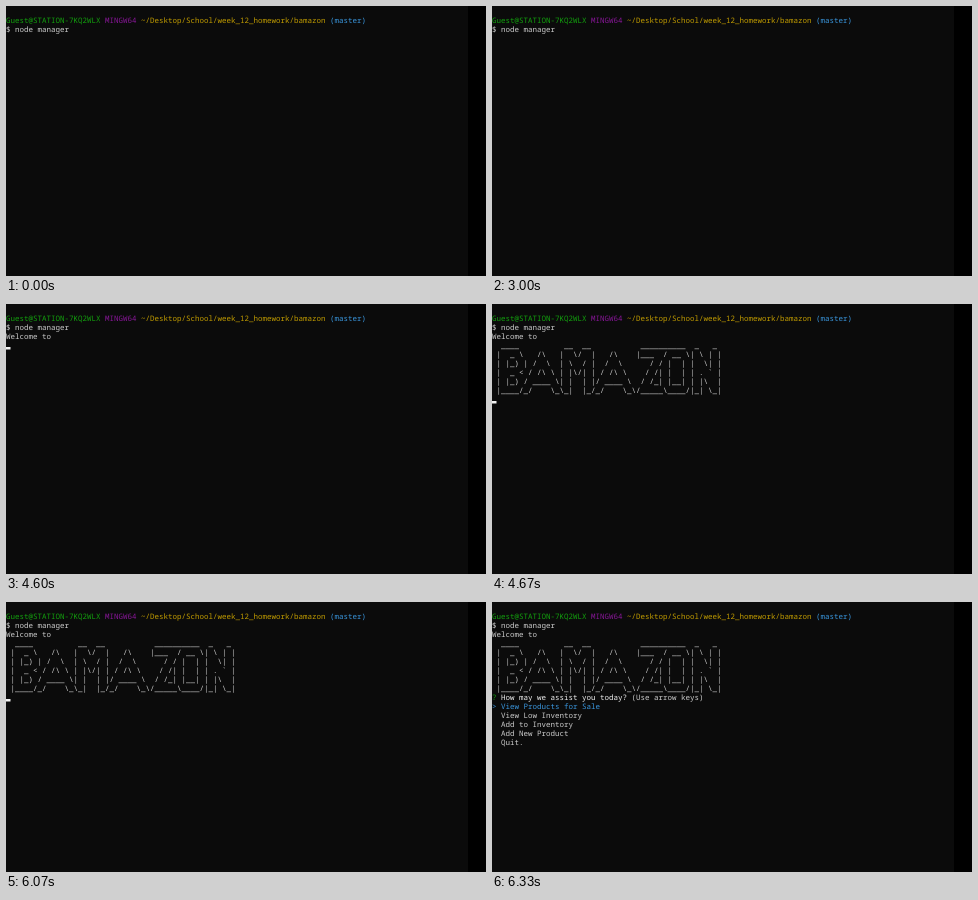
An HTML page that plays this animation: 480 px wide and 270 px high, repeating every 8000 ms.

```html
<!DOCTYPE html>
<html lang="en">
<head>
<meta charset="utf-8">
<title>Terminal</title>
<style>
  html, body { margin: 0; width: 100%; height: 100%; overflow: hidden; background: #000; }
  svg { display: block; width: 480px; height: 270px; }
  text {
    font: 500 7.5px "Noto Sans Mono", "DejaVu Sans Mono", monospace;
    white-space: pre;
    text-rendering: geometricPrecision;
  }
</style>
</head>
<body>
<svg id="stage" viewBox="0 0 480 270">
  <rect width="462" height="270" fill="#0b0b0b"/>
</svg>
<script>
const LOOP = 8000, ROW = 9, BASELINE = 16.6;
const GREY = '#cccccc', WHITE = '#f2f2f2', GREEN = '#13a10e',
      PURPLE = '#881798', GOLD = '#c19c00', BLUE = '#3a96dd';
const stage = document.getElementById('stage');

function add(parent, tag, attrs, content = '') {
  const el = document.createElementNS('http://www.w3.org/2000/svg', tag);
  for (const key in attrs) el.setAttribute(key, attrs[key]);
  el.textContent = content;
  return parent.appendChild(el);
}

// steps: [time in ms, style] pairs, each held until the next one
function play(el, steps) {
  const frames = steps.map(([time, style]) => ({ offset: time / LOOP, easing: 'step-end', ...style }));
  frames.push({ ...steps.at(-1)[1], offset: 1 });
  el.animate(frames, { duration: LOOP, iterations: Infinity });
}

// each line is a list of [colour, text] runs
function print(time, firstRow, lines) {
  const group = add(stage, 'g', {});
  lines.forEach((runs, i) => {
    const line = add(group, 'text', { x: 0, y: BASELINE + (firstRow + i) * ROW });
    for (const [fill, content] of runs) add(line, 'tspan', { fill }, content);
  });
  if (time) play(group, [[0, { opacity: 0 }], [time, { opacity: 1 }]]);
}

const banner = String.raw`
  ____          __  __           __________  _   _
 |  _ \   /\   |  \/  |   /\    |___  / __ \| \ | |
 | |_) | /  \  | \  / |  /  \      / / |  | |  \| |
 |  _ < / /\ \ | |\/| | / /\ \    / /| |  | | . ${'`'} |
 | |_) / ____ \| |  | |/ ____ \  / /_| |__| | |\  |
 |____/_/    \_\_|  |_/_/    \_\/_____\____/|_| \_|`.split('\n').slice(1);

print(0, 0, [
  [[GREEN, 'Guest@STATION-7KQ2WLX '], [PURPLE, 'MINGW64 '],
   [GOLD, '~/Desktop/School/week_12_homework/bamazon '], [BLUE, '(master)']],
  [[GREY, '$ node manager']]
]);
print(4600, 2, [[[GREY, 'Welcome to']]]);
print(4670, 3, banner.map(line => [[GREY, line]]));
print(6270, 9, [
  [[GREEN, '? '], [WHITE, 'How may we assist you today? '], [GREY, '(Use arrow keys)']],
  [[BLUE, '> View Products for Sale']],
  ...['View Low Inventory', 'Add to Inventory', 'Add New Product', 'Quit.']
    .map(item => [[GREY, '  ' + item]])
]);

const cursor = add(stage, 'rect', { x: 0, y: 16, width: 4.5, height: 2.5, fill: WHITE });
const atRow = row => ({ opacity: 1, transform: `translateY(${row * ROW}px)` });
const hidden = { opacity: 0, transform: 'translateY(0px)' };
play(cursor, [[0, hidden], [4400, atRow(2)], [4600, atRow(3)], [4670, atRow(9)], [6270, hidden]]);
</script>
</body>
</html>
```
